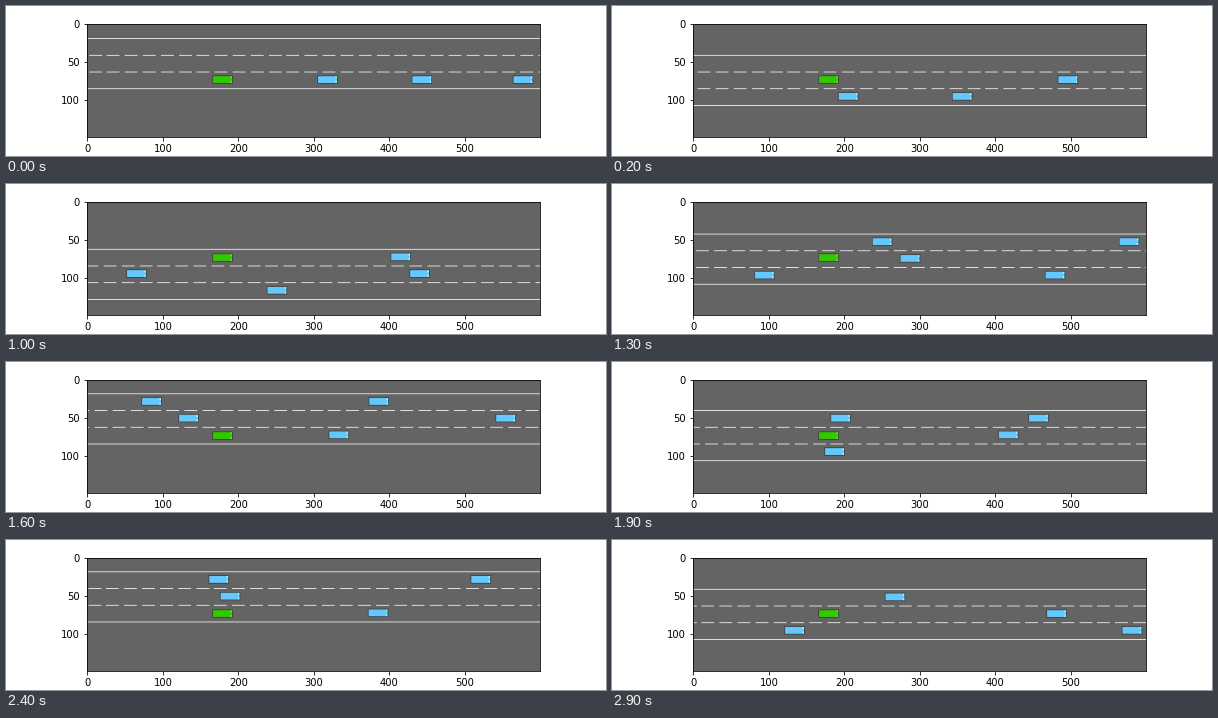
Recreate the animation shown at these times as a matplotlib script. Size 600 by 150 pixels, loop 3 s.

```python
import numpy as np
import matplotlib.pyplot as plt
from matplotlib.animation import FuncAnimation

W, H = 600, 150
FRAMES, INTERVAL = 30, 100

ROAD = (100, 100, 100)
LINE = (255, 255, 255)
EDGE = (60, 60, 60)
GREEN = (50, 200, 0)
BLUE = (100, 200, 255)

LANE = 22                      # lane width
DASH, DASH_PITCH = 17, 4.33 * 5.5
CAR_W, CAR_H = 27, 11
EGO_X, EGO_Y = 166, 69
TOP = 64                       # upper road edge while driving in lane 0

# The green car's lane changes: step -> direction (+1 is down).
MOVES = {1: -1, 3: -1, 13: 1, 14: 1, 18: -1, 22: 1, 26: -1}

# Blue cars: lane, step, left edge at that step, speed relative to the green car.
CARS = [
    (2, 0, 305, 76), (2, 0, 430, 58.5), (1, 10, 52, 54.4), (2, 10, 238, 52.3),
    (0, 10, 402, 55), (1, 10, 427, 51), (2, 13, 466, 48.7), (0, 13, 564, 63.7),
    (1, 19, 404, 45.6), (0, 19, 444, 56.7), (2, 24, 372, 50.2),
    (0, 24, 508, 50.8), (1, 29, 468, 50), (2, 29, 568, 51),
]
MERGING, MERGE_STEP = 2, 2     # this car starts one lane lower


def travel(i):
    """Steps driven at full speed; the green car first has to accelerate."""
    return i - 0.59 * (1 - np.exp(-i))


def road_top(i):
    lane = 2 + sum(d * (1 - 0.09 ** (i - s + 1)) for s, d in MOVES.items() if i >= s)
    sway = np.sin(np.pi * (i - 1) / (FRAMES - 2))
    return round(TOP - LANE * lane - sway)


def fill(img, x, y, w, h, color):
    x0, x1 = max(x, 0), max(x + w, 0)
    img[y:y + h, x0:x1] = color


def draw_car(img, x, y, color):
    light = np.minimum(np.array(color) / 0.68, 255)
    fill(img, x, y, CAR_W, CAR_H, EDGE)
    fill(img, x + 1, y + 1, CAR_W - 2, CAR_H - 2, color)
    for dy in (1, 7):
        fill(img, x + CAR_W - 3, y + dy, 2, 3, light)


def draw_road(img, top, i):
    for k in (0, 3):
        fill(img, 0, top + k * LANE, W, 1, LINE)
    phase = (3 + 1.95 * i) % DASH_PITCH
    for k in (1, 2):
        for start in np.arange(phase - DASH_PITCH, W, DASH_PITCH):
            fill(img, int(np.floor(start)), top + k * LANE, DASH, 1, LINE)


def scene(i):
    img = np.full((H, W, 3), ROAD, np.uint8)
    top = road_top(i)
    draw_road(img, top, i)
    for n, (lane, step, x, speed) in enumerate(CARS):
        if n == MERGING and i < MERGE_STEP:
            lane += 1
        left = round(x - speed * (travel(i) - travel(step)))
        draw_car(img, left, top + 5 + LANE * lane, BLUE)
    draw_car(img, EGO_X, EGO_Y, GREEN)
    return img


fig, ax = plt.subplots(figsize=(W / 72, H / 72), dpi=72)
fig.subplots_adjust(left=0.125, right=0.9, bottom=0.125, top=0.88)
view = ax.imshow(scene(0))


def update(i):
    view.set_data(scene(i))
    return [view]


anim = FuncAnimation(fig, update, frames=FRAMES, interval=INTERVAL, repeat=True)
plt.show()
```
